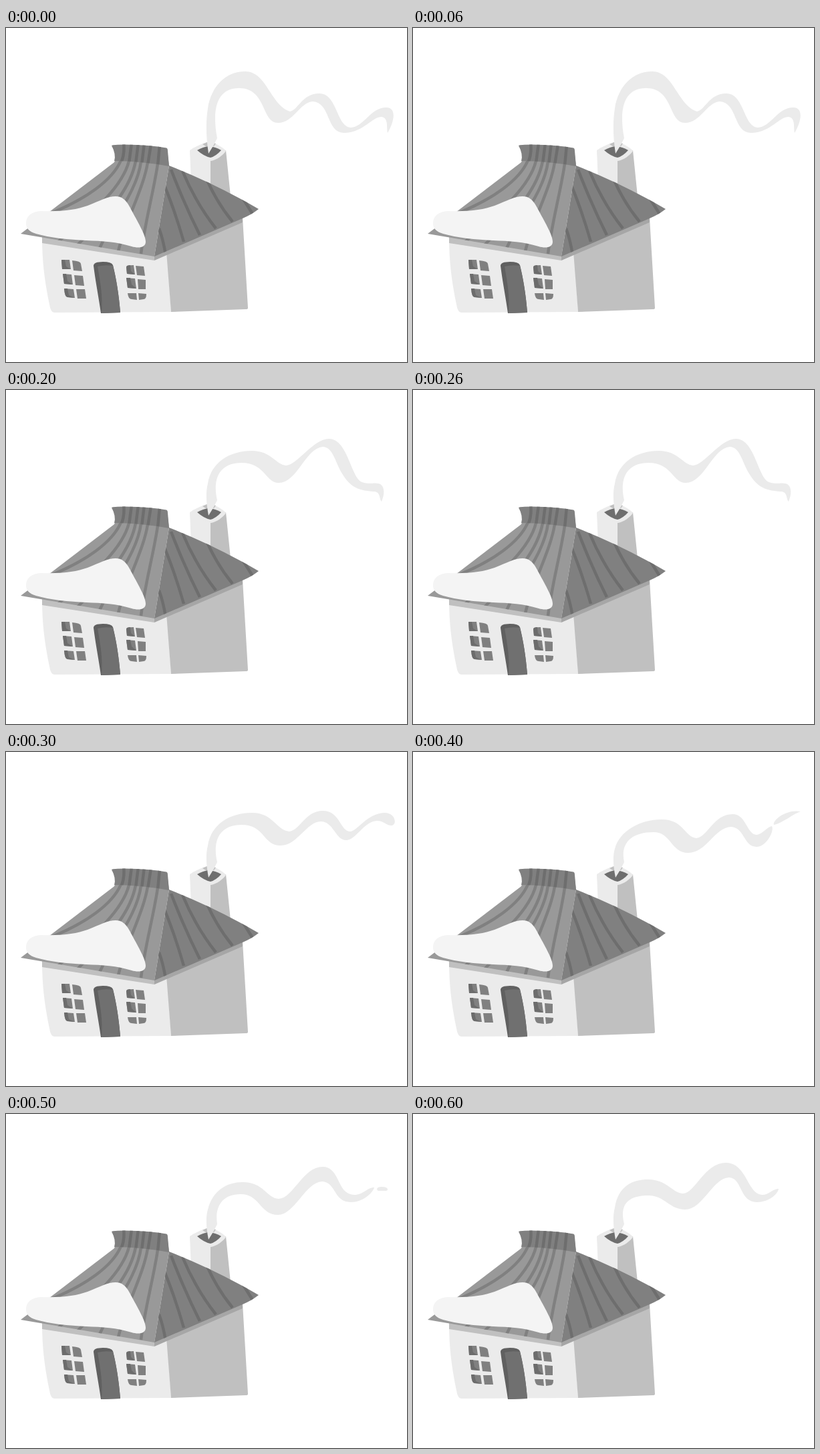
Recreate the animation shown at these times as an HTML page. Size 600x500 px, loop 0.7 s.

```html
<!DOCTYPE html>
<html lang="en">
<head>
<meta charset="utf-8">
<title>House with chimney smoke</title>
<style>
html, body { margin: 0; width: 100%; height: 100%; overflow: hidden; background: #fff; }
svg { display: block; width: 100vw; height: 100vh; }
.stripes { fill: none; stroke-width: 4.5; }
#smoke path { display: none; }
#smoke path.on { display: inline; }
</style>
</head>
<body>
<svg viewBox="0 0 600 500">
  <defs>
    <clipPath id="front"><path d="M22 308L162 201L166 190H242L244 206L222 342Z"/></clipPath>
    <clipPath id="side"><path d="M244 206Q313 233 378 271Q368 279 354 285L222 342Z"/></clipPath>
    <clipPath id="cap"><path d="M158 176Q160 174.500 178 174.500Q215 175 240 179.500Q242 180 242 184L244 207Q200 199 162 199Q165 189 158 176Z"/></clipPath>
  </defs>

  <!-- Chimney -->
  <path fill="#ebebeb" d="M275 183L307 196L306 240L277 230Z"/>
  <path fill="#c0c0c0" d="M306 197L329 183L336 252L306 240Z"/>
  <path fill="#ebebeb" d="M275 183C282 178 294 173 303 170C314 172 325 179 329 184C326 190 314 198 307 199C296 197 281 190 275 183Z"/>
  <path fill="#c0c0c0" d="M294 174L303 170L314 173L311 177L299 177Z"/>
  <path fill="#6e6e6e" d="M286 183Q295 178 303 177Q314 178 322 183Q314 192 306 194Q296 192 286 183Z"/>

  <!-- Walls -->
  <path fill="#ebebeb" d="M54 314L241 335L247 425L72 426Q67 426 65 414C58 380 54 350 54 314Z"/>
  <path fill="#c0c0c0" d="M240 335L354 284L362 419Q362 421 359 421L247 425Z"/>
  <path fill="#c0c0c0" d="M54 312L222 341V348L54 322Z"/>
  <path fill="#a6a6a6" d="M222 341L354 284V291L222 348Z"/>

  <!-- Roof -->
  <g clip-path="url(#front)">
    <path fill="#999" d="M0 190H260V350H0Z"/>
    <path class="stripes" stroke="#808080" d="M172 198C160 227 120 257 60 280M184 199C174 240 125 280 78 320M194 199C186 245 145 285 106 326M202 200C196 245 160 285 140 330M212 201C206 240 180 285 168 334M227 203C222 240 208 290 202 338"/>
  </g>
  <g clip-path="url(#side)">
    <path fill="#808080" d="M210 200H390V350H210Z"/>
    <path class="stripes" stroke="#6e6e6e" d="M229 300Q235 316 239 340M238 238Q253 275 266 320M247 212Q266 262 290 310M264 214Q284 262 314 300M301 228Q316 262 339 290M355 256L370 280"/>
  </g>
  <g clip-path="url(#cap)">
    <path fill="#808080" d="M150 165H250V210H150Z"/>
    <path class="stripes" stroke="#6e6e6e" d="M176 172Q178 188 172 202M188 172L184 202M198 172L194 203M207 172L203 204M217 174L212 205M230 175L227 206"/>
  </g>
  <path fill="#f4f4f4" d="M30 293C30 280 40 275 52 274C85 275 105 272 122 266C140 259 152 252 164 252C178 252 183 264 189 275C198 292 209 310 209 320C209 329 198 330 188 327C165 320 145 319 120 318C95 317 65 314 45 308C35 305 30 300 30 293Z"/>

  <!-- Windows and door -->
  <path fill="#808080" d="M83 347L95 347L97 361L84 361ZM99 348Q112 349 112 353L114 364L101 363ZM85 368L98 369L100 384L87 383ZM102 370L115 371L117 386L104 385ZM87 390L101 391L103 404L92 403Q88 403 87 390ZM105 391L118 391L120 405L107 405ZM180 358Q180 355 191 355L193 369L181 368ZM194 356L206 357L208 371L196 370ZM180 374L193 375L195 390L182 389ZM197 376L209 377L209 391L198 391ZM182 397L195 397L196 407L188 406Q183 406 182 397ZM198 397L210 398Q210 406 206 406L199 407Z"/>
  <path fill="#6c6c6c" d="M83 347H88L90 357L97 361L84 361ZM85 368H90L92 379L100 384L87 383ZM87 390H92L94 400L103 404L92 403Q88 403 87 390ZM180 358Q180 355 186 355L187 364L193 369L181 368ZM180 374H186L188 384L195 390L182 389Z"/>
  <path fill="#606060" d="M131 356Q131 350 145 350Q158 350 160 355C165 375 169 400 171 426L142 427C139 405 134 380 131 356Z"/>
  <path fill="#707070" d="M137 357Q148 354 160 356C165 375 169 400 171 426L143 427C145 400 141 380 137 357Z"/>

  <g id="smoke" fill="#ebebeb">
    <path d="M303 188C299 160 299 140 302 120C307 88 328 65 358 65C390 65 396 116 425 125C437 123 443 98 469 98C496 98 494 148 516 149C536 148 545 119 569 119C584 119 582 138 571 157C569 150 573 135 562 133C547 133 535 157 505 157C479 156 486 112 459 110C440 111 430 142 407 142C382 142 390 90 349 90C315 90 308 122 316 165Q311 176 303 188Z"/>
    <path d="M303 188C299 165 299 150 302 136C307 100 330 81 366 81C400 81 406 105 425 108C441 106 447 80 471 80C505 80 500 134 524 136C542 137 556 126 570 126C586 126 585 148 578 149C571 149 574 139 563 139C552 139 546 147 526 147C480 147 491 95 463 94C444 95 432 132 411 132C389 132 385 106 349 106C322 106 308 125 316 165Q311 176 303 188Z"/>
    <path d="M303 188C299 165 299 152 302 140C307 108 335 91 368 91C397 91 404 112 419 113C435 113 460 73 483 73C512 73 516 133 533 138C545 142 550 138 557 140C567 142 567 155 562 167C558 163 561 153 551 152C520 151 511 139 501 122C492 105 488 85 474 85C448 87 436 139 408 139C388 139 388 109 352 109C322 109 308 130 316 165Q311 176 303 188Z"/>
    <path d="M303 188C299 165 299 152 302 140C307 108 335 91 368 91C400 91 404 117 424 119C440 117 448 88 474 88C500 88 500 119 515 119C525 119 540 92 566 91C584 91 585 110 577 110C568 110 566 103 555 103C535 104 524 132 509 132C493 132 490 104 471 104C450 104 436 140 411 140C384 140 388 109 352 109C322 109 308 130 316 165Q311 176 303 188Z"/>
    <path d="M303 188C299 168 299 155 302 145C309 118 340 101 372 101C405 101 406 127 424 129C441 127 450 93 478 93C499 93 499 123 514 124C523 123 530 112 537 111C541 118 529 142 514 142C495 142 496 113 476 112C451 113 439 151 412 151C386 151 386 120 360 120C325 120 310 138 316 165Q311 176 303 188ZM540 109C537 103 558 85 580 89C570 92 552 107 540 109Z"/>
    <path d="M303 188C299 168 299 153 302 143C309 115 330 102 354 102C386 102 390 126 408 127C430 126 444 79 474 79C500 79 495 121 521 121C535 121 540 110 551 110C549 118 534 132 516 132C490 132 494 102 473 101C448 102 432 151 407 151C380 151 380 120 351 120C324 120 312 138 316 165Q311 176 303 188ZM555 112Q556 109 562 109Q571 109 571 113Q571 115 567 115H558Q555 115 555 112Z"/>
    <path d="M303 188C299 165 299 152 302 140C307 108 328 98 352 98C380 98 389 119 404 119C422 119 436 73 468 73C500 73 500 121 523 121C532 121 540 111 547 112C546 120 532 132 515 132C488 132 493 96 473 95C448 96 434 143 407 143C384 143 376 122 353 122C325 122 308 132 316 165Q311 176 303 188Z"/>
  </g>
</svg>
<script>
const poses = [...document.querySelectorAll('#smoke path')];
const HOLD = 100;

// The smoke is held for each pose, then snaps to the next.
function draw() {
  const current = Math.floor(performance.now() / HOLD) % poses.length;
  poses.forEach((pose, i) => pose.classList.toggle('on', i === current));
  requestAnimationFrame(draw);
}
draw();
</script>
</body>
</html>
```
